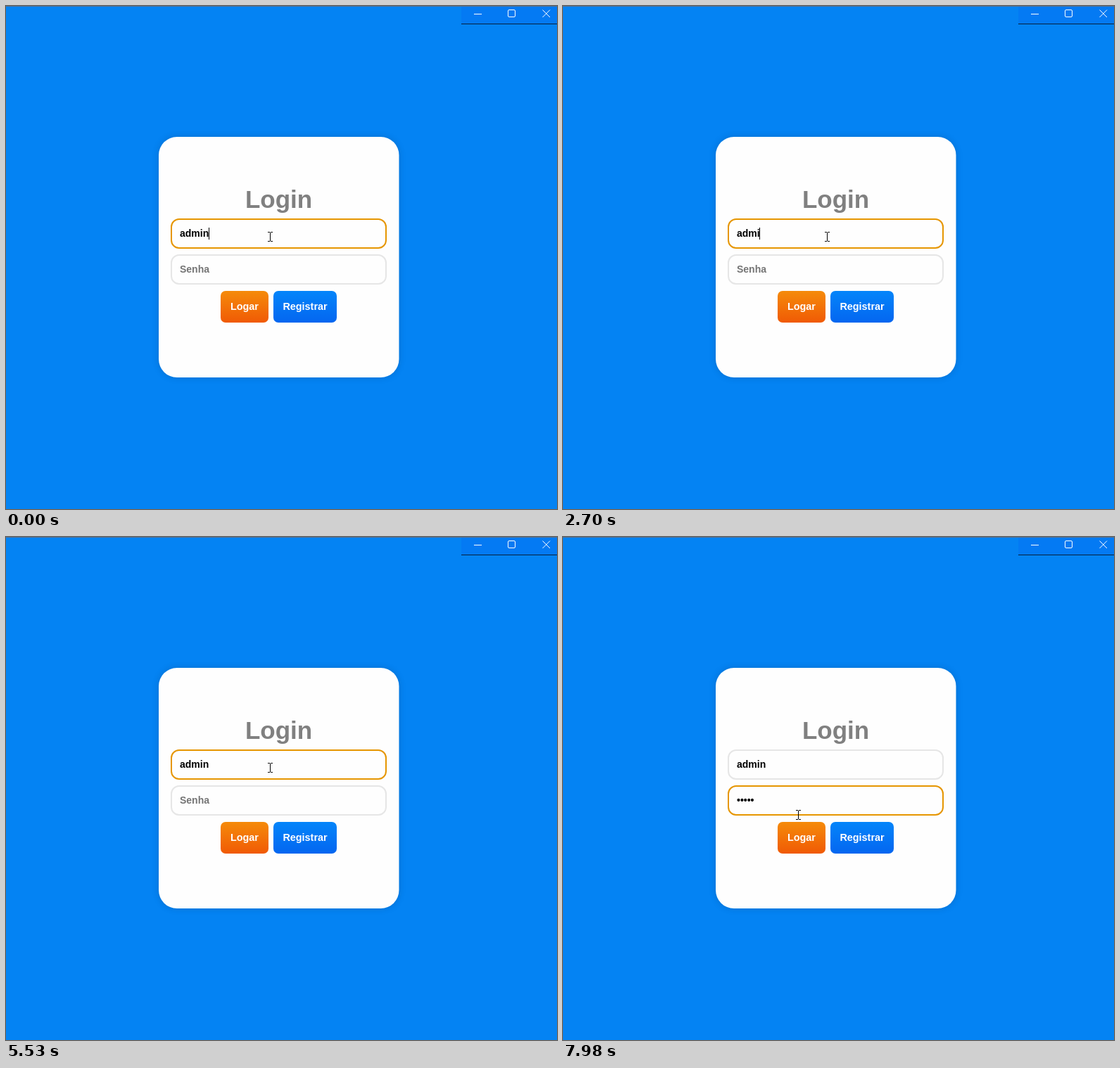
An HTML page for the animation above (8 s loop, 783 px wide and 715 px high).

```html
<!DOCTYPE html>
<html lang="pt">
<head>
<meta charset="utf-8">
<title>Login</title>
<style>
  html, body { margin: 0; width: 100%; height: 100%; overflow: hidden; background: #0483f3; }
  svg { display: block; }
  text { font: bold 14px "Liberation Sans", Arial, sans-serif; white-space: pre; }
  .title { font-size: 35px; fill: #808080; }
  .button { font-size: 14.4px; fill: #fff; }
  .middle { text-anchor: middle; }
  .card { fill: #fefefe; filter: drop-shadow(0 0 5px rgba(0, 0, 0, .15)); }
  .field { fill: #fefefe; stroke: #e6e6e6; stroke-width: 2; }
  .field.focus { stroke: #e69600; }
  .empty { fill: #757575; }
  .icon { fill: none; stroke: #fff; }
</style>
</head>
<body>
<svg width="783" height="715" viewBox="0 0 783 715">
  <defs>
    <linearGradient id="orange" x2="0" y2="1">
      <stop stop-color="#f58b0a"/><stop offset="1" stop-color="#f05a05"/>
    </linearGradient>
    <linearGradient id="blue" x2="0" y2="1">
      <stop stop-color="#0485fa"/><stop offset="1" stop-color="#0466f0"/>
    </linearGradient>
  </defs>

  <rect width="783" height="715" fill="#0483f3"/>
  <rect width="783" height="1" fill="#4f7196"/>
  <rect x="647" y="1" width="136" height="24" fill="#047af3"/>
  <rect x="647" y="25" width="136" height="1" fill="#06203c"/>
  <g class="icon">
    <path d="M665 11.5h11"/>
    <rect x="713.5" y="5.500" width="10" height="10" rx="1.5"/>
    <path d="M762.500 5.500l10.500 10.500m0-10.500l-10.500 10.500"/>
  </g>

  <rect class="card" x="217" y="186" width="341.500" height="342" rx="26"/>
  <text class="title middle" x="387.5" y="287">Login</text>

  <rect class="field" id="userField" x="235" y="303" width="305" height="41" rx="11"/>
  <rect class="field" id="passField" x="235" y="354" width="305" height="41" rx="11"/>
  <text id="user" x="247" y="328"></text>
  <text id="pass" x="247" y="379"></text>
  <rect id="caret" width="1" height="17"/>

  <rect x="305" y="405" width="68" height="45" rx="7" fill="url(#orange)"/>
  <rect x="380" y="405" width="90" height="45" rx="7" fill="url(#blue)"/>
  <text class="button middle" x="339" y="432">Logar</text>
  <text class="button middle" x="425" y="432">Registrar</text>

  <path id="mouse" d="M-3-7h3v1h1v-1h3v1h-3v12h3v1h-3v-1h-1v1h-3v-1h3v-12h-3z"/>
</svg>
<script>
const LOOP = 8000;
const TEXT_X = 247;
const $ = id => document.getElementById(id);

// Each track lists [start in ms, value]; a value holds until the next one.
const tracks = {
  user: [[0, 'admin'], [1610, 'admi'], [1670, 'adm'], [1850, 'ad'], [1910, 'a'], [2030, ''],
         [2340, 'a'], [2460, 'ad'], [2580, 'adm'], [2700, 'admi'], [4970, 'admin']],
  dots: [[0, 0], [6510, 1], [6690, 2], [6940, 3], [7000, 4], [7180, 5]],
  focus: [[0, 'user'], [2880, 'pass'], [4300, 'user'], [6140, 'pass']],
  caret: [[0, 1], [430, 0], [990, 1], [1490, 0], [2090, 1], [3440, 0], [3940, 1],
          [4850, 0], [4970, 1], [5530, 0], [6030, 1], [7670, 0]],
  mouse: [[0, [375, 328]], ...mousePath(), [7730, [337, 388]], [7980, [334, 395]]]
};

function mousePath() {
  const count = 8;
  return Array.from({ length: count }, (_, i) => {
    const p = (i + 1) / count;
    const eased = p * p * (3 - 2 * p);
    return [5590 + 60 * i, [Math.round(375 - 37 * eased), Math.round(328 + 60 * eased)]];
  });
}

function valueAt(track, t) {
  let value = track[0][1];
  for (const [start, next] of track) {
    if (start > t) break;
    value = next;
  }
  return value;
}

// Advance widths in em of the bold face.
const widths = { a: .556, d: .611, m: .889, i: .278, n: .611, '•': .35 };
const caretX = text => Math.floor(TEXT_X + 14 * [...text].reduce((sum, c) => sum + widths[c], 0) + .01);

function showText(id, text, placeholder) {
  const node = $(id);
  const shown = text || placeholder;
  if (node.textContent !== shown) node.textContent = shown;
  node.classList.toggle('empty', !text);
}

function render(t) {
  const user = valueAt(tracks.user, t);
  const pass = '•'.repeat(valueAt(tracks.dots, t));
  const onUser = valueAt(tracks.focus, t) === 'user';
  const [x, y] = valueAt(tracks.mouse, t);

  showText('user', user, 'Login');
  showText('pass', pass, 'Senha');
  $('userField').classList.toggle('focus', onUser);
  $('passField').classList.toggle('focus', !onUser);

  const caret = $('caret');
  caret.setAttribute('x', caretX(onUser ? user : pass));
  caret.setAttribute('y', onUser ? 315 : 366);
  caret.setAttribute('opacity', valueAt(tracks.caret, t));
  $('mouse').setAttribute('transform', `translate(${x} ${y})`);
}

const began = performance.now();
function tick() {
  render((performance.now() - began) % LOOP);
  requestAnimationFrame(tick);
}
tick();
</script>
</body>
</html>
```
